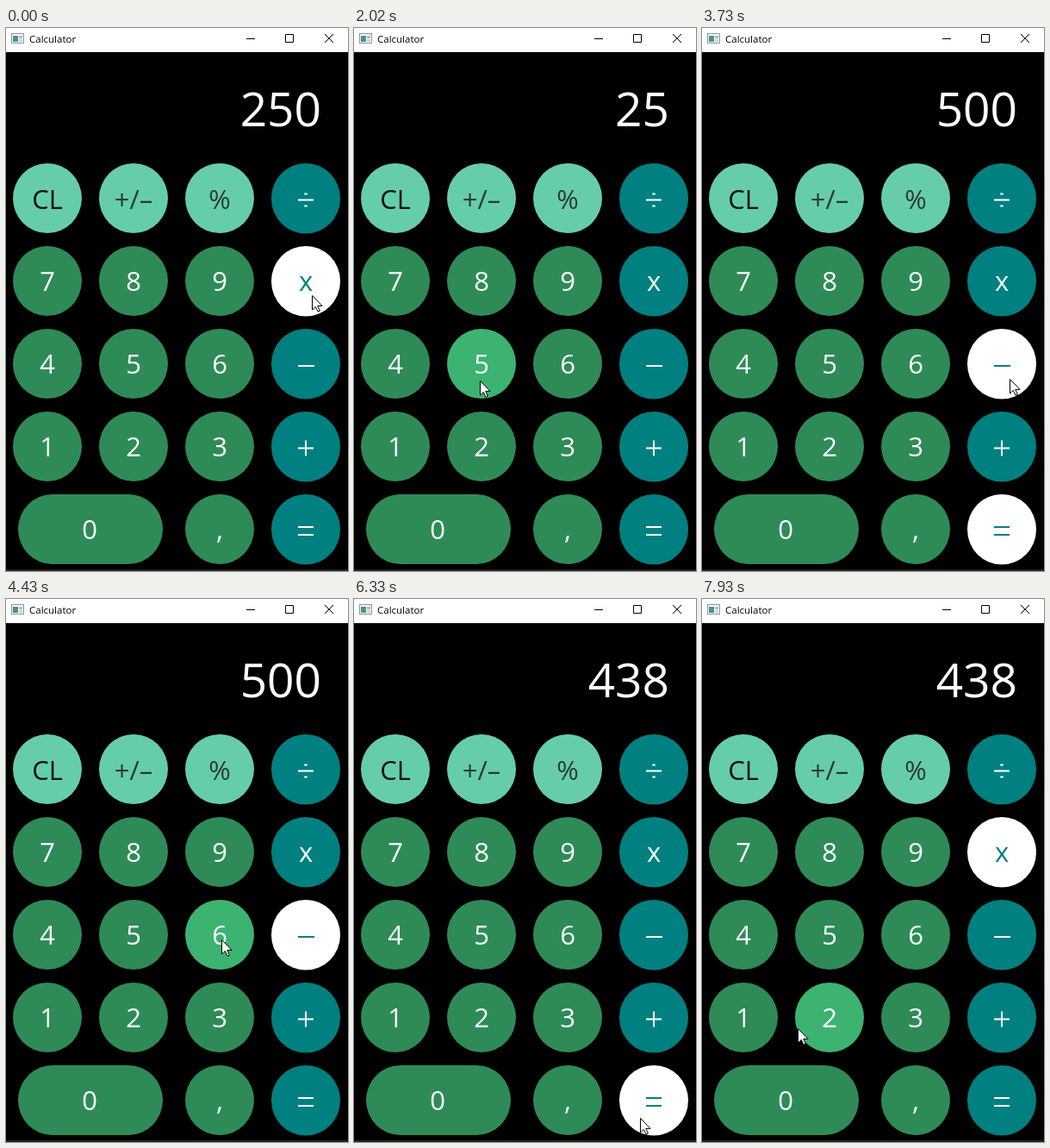
An HTML page for the animation above (8000 ms loop, 397 px wide and 630 px high).

```html
<!DOCTYPE html>
<html lang="en">
<head>
<meta charset="utf-8">
<title>Calculator</title>
<style>
  html, body { margin: 0; width: 100%; height: 100%; overflow: hidden; background: #000; }
  svg { display: block; width: 397px; height: 630px; }
  text { font-family: "Open Sans", "Noto Sans", sans-serif; }
  .key text { font-size: 31px; text-anchor: middle; }
  .key path { fill: none; stroke-width: 2; }
</style>
</head>
<body>
<svg viewBox="0 0 397 630">
  <rect width="397" height="630"/>
  <rect width="397" height="28" fill="#fff"/>
  <rect y="628" width="397" height="2" fill="#222"/>
  <g id="icon">
    <rect x="6.5" y="6.5" width="14" height="11" fill="#f4f6f7" stroke="#8796a0"/>
    <rect x="8" y="9" width="6" height="7" fill="#4c918d"/>
    <rect x="15" y="9" width="4" height="3" fill="#a9bcc8"/>
    <rect x="15" y="13" width="4" height="3" fill="#c9d3d9"/>
  </g>
  <text x="27" y="17" font-size="11.5">Calculator</text>
  <path d="M279 12.5h10M324.5 7.5h9v9h-9zM370 7l10 10M380 7l-10 10" fill="none" stroke="#000"/>
  <text id="display" x="366" y="114" font-size="55" text-anchor="end" fill="#fff"></text>
  <g id="keys"></g>
  <path id="cursor" d="M.5 .5V17L4.3 13.4L7 19.2L9.4 18.2L6.8 12.4H12Z" fill="#fff" stroke="#000"/>
</svg>
<script>
const LOOP = 8000;
const $ = id => document.getElementById(id);

function add(parent, tag, attrs, content = '') {
  const node = document.createElementNS('http://www.w3.org/2000/svg', tag);
  for (const name in attrs) node.setAttribute(name, attrs[name]);
  node.textContent = content;
  return parent.appendChild(node);
}

// Colours per kind: [fill, text, hover fill, hover text]
const styles = {
  top: ['#66cdaa', '#2a3b38', '#8fe0c4', '#2a3b38'],
  digit: ['#2e8b57', '#fff', '#3cb371', '#fff'],
  op: ['#008080', '#fff', '#fff', '#008080']
};

// Operator signs, relative to the key's label centre
const signs = {
  '÷': 'M-9 0H9M-1.7 -7H1.7M-1.7 7H1.7',
  '–': 'M-9 0H10',
  '+': 'M-9 0H9M0 -9V9',
  '=': 'M-9 -4.5H9M-9 4.5H9'
};

const layout = [
  ['CL', '+/–', '%', '÷'],
  ['7', '8', '9', 'x'],
  ['4', '5', '6', '–'],
  ['1', '2', '3', '+'],
  ['0', null, ',', '=']
];

function makeKey(label, col, row) {
  const kind = col === 3 ? 'op' : row === 0 ? 'top' : 'digit';
  const wide = label === '0';
  const x = wide ? 14 : 8 + col * 100;
  const y = 157 + row * 96;
  const w = wide ? 168 : 80;
  const h = kind === 'op' ? 81.5 : 81;
  const group = add($('keys'), 'g', { class: 'key' });
  const body = add(group, 'rect', { x, y, width: w, height: h, rx: 40, ry: 40.5 });
  const sign = signs[label];
  const cx = x + w / 2;
  const mark = sign
    ? add(group, 'path', { d: sign, transform: `translate(${cx} ${y + (label === '–' ? 35 : 42.5)})` })
    : add(group, 'text', { x: wide ? 97 : cx, y: y + (row ? 52 : 52.5) }, label);
  if (label === '–') mark.setAttribute('transform', `translate(${cx} ${y + 43})`);
  const [fill, ink, hotFill, hotInk] = styles[kind];
  return {
    label,
    contains: (px, py) => px >= x && px <= x + w && py >= y && py <= y + h,
    paint(hot) {
      body.setAttribute('fill', hot ? hotFill : fill);
      const color = label === 'CL' ? '#0a1512' : hot ? hotInk : ink;
      mark.setAttribute(sign ? 'stroke' : 'fill', color);
    }
  };
}

const keys = layout.flatMap((labels, row) =>
  labels.map((label, col) => label && makeKey(label, col, row)).filter(Boolean));

// The screen refreshes in bursts: [first, last, count]
const bursts = [
  [400, 910, 5], [1060, 1330, 3], [1600, 2020, 4], [2170, 2560, 4],
  [2710, 3730, 7], [4160, 4430, 3], [4860, 5160, 3], [5280, 5900, 5],
  [6330, 6330, 1], [6730, 7660, 8], [7780, 7930, 2]
];
const ticks = [0, ...bursts.flatMap(([first, last, n]) =>
  Array.from({ length: n }, (_, i) => n > 1 ? first + (last - first) * i / (n - 1) : first))];

// Pointer route: [time, x, y]
const route = [
  [0, 355, 310], [400, 355, 324], [910, 354, 475], [1060, 345, 500],
  [1200, 170, 565], [1330, 150, 497], [1600, 150, 495], [1750, 149, 470],
  [2020, 146, 409], [2170, 145, 412], [2560, 97, 582], [2710, 98, 583],
  [3220, 345, 590], [3390, 347, 588], [3730, 357, 407], [4160, 350, 404],
  [4430, 250, 395], [4860, 245, 398], [5160, 157, 484], [5430, 155, 486],
  [5900, 335, 600], [6330, 332, 602], [6730, 334, 590], [7200, 350, 310],
  [7330, 350, 308], [7660, 122, 474], [7930, 111, 498]
];

const shown = [
  [0, '250'], [1600, '2'], [2020, '25'], [2710, '250'],
  [3390, '500'], [4860, '6'], [5280, '62'], [6330, '438']
];
const active = [
  [0, ''], [910, '+'], [1600, ''], [3390, '='], [4160, '–'],
  [4860, ''], [6330, '='], [7200, 'x']
];

const latest = (list, t) => list.findLast(([start]) => start <= t)[1];

function pointerAt(t) {
  const next = route.findIndex(([time]) => time > t);
  if (next < 0) return route.at(-1).slice(1);
  const [t0, x0, y0] = route[next - 1];
  const [t1, x1, y1] = route[next];
  const k = (t - t0) / (t1 - t0);
  return [x0 + (x1 - x0) * k, y0 + (y1 - y0) * k].map(Math.round);
}

function render(time) {
  const t = ticks.findLast(tick => tick <= time);
  const [x, y] = pointerAt(t);
  const held = latest(active, t);
  $('display').textContent = latest(shown, t);
  $('cursor').setAttribute('transform', `translate(${x} ${y})`);
  for (const key of keys) key.paint(key.label === held || key.contains(x, y));
}

const start = performance.now();
function loop() {
  render((performance.now() - start) % LOOP);
  requestAnimationFrame(loop);
}
loop();
</script>
</body>
</html>
```
